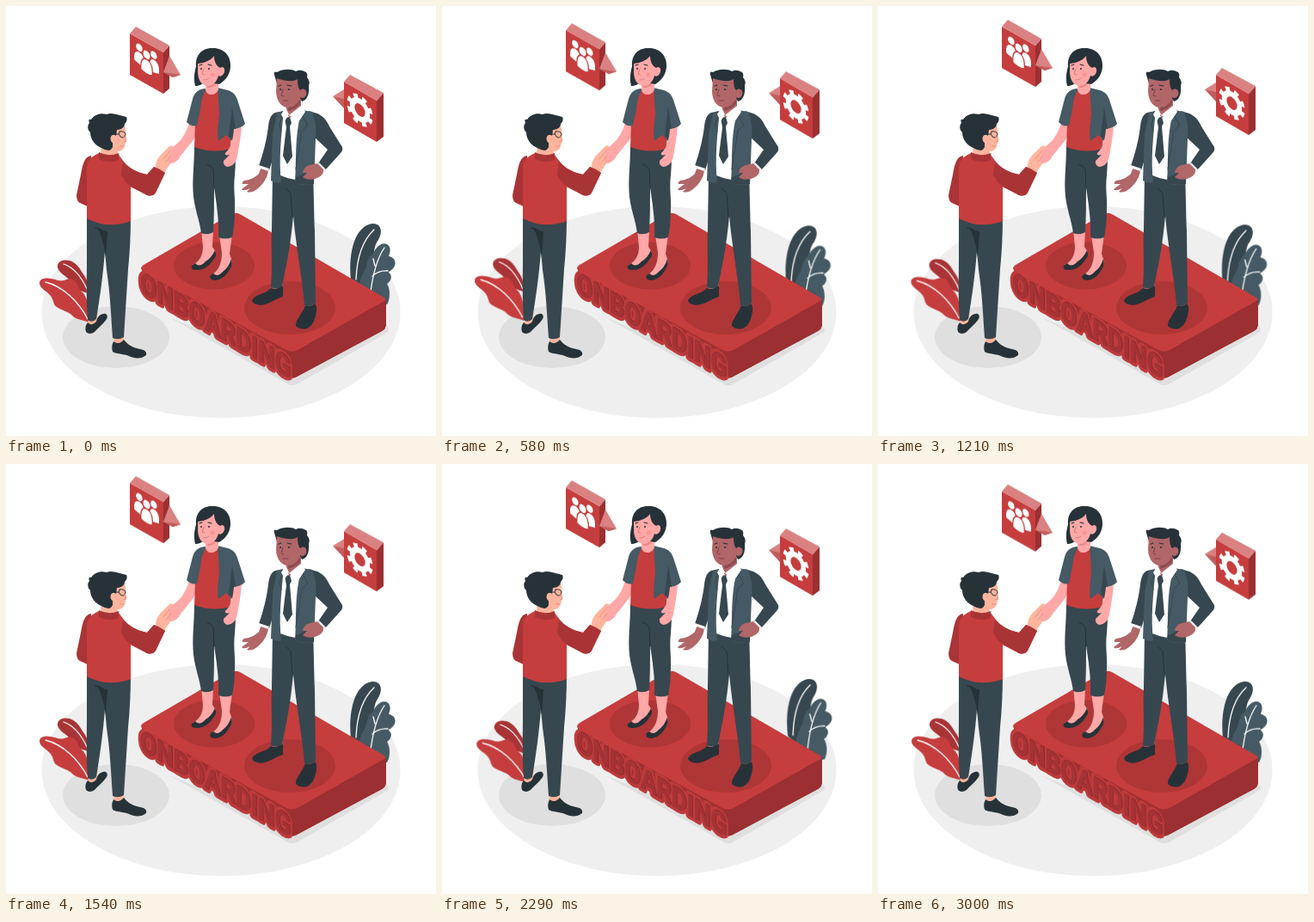
An HTML page that plays this animation: 500x500 px, repeating every 3040 ms.

```html
<!DOCTYPE html>
<html lang="en">
<head>
<meta charset="utf-8">
<title>Onboarding</title>
<style>
  html, body { margin: 0; width: 100%; height: 100%; overflow: hidden; background: #fff; }
  svg { display: block; width: 100%; height: 100%; }
  :root { --red: #c63d3d; --deep: #9e3032; --rose: #da8181; --ink: #263238; --slate: #37474f; --steel: #455a64; }
  .red { fill: var(--red); }
  .dim { fill: #a93436; }
  .deep { fill: var(--deep); }
  .rose { fill: var(--rose); }
  .ink { fill: var(--ink); }
  .slate { fill: var(--slate); }
  .steel { fill: var(--steel); }
  .white { fill: #fff; }
  .peach { fill: #ffb59d; }
  .pink { fill: #ffa8a7; }
  .brown { fill: #b16668; }
  .shade { fill: #000; opacity: .12; }
  .line { fill: none; stroke-linecap: round; stroke-linejoin: round; }
  .vein { stroke: #fff; stroke-width: 1.3; }
  .fine { stroke: var(--ink); stroke-width: 1; }
  .float { animation: float 3.04s linear infinite; }
  .sway { transform-box: view-box; transform-origin: 250px 250px; animation: sway 3.04s linear infinite; }
  @keyframes float { 50% { transform: translateY(-10px); } }
  @keyframes sway { 25% { transform: rotate(1deg); } 75% { transform: rotate(-1deg); } }
  .word { font: 700 34px Roboto, Arial, sans-serif; stroke-linejoin: round; }
  .rim { fill: #bd3a3b; stroke: #bd3a3b; stroke-width: 8.5; }
  .side { fill: #8e2b2d; stroke: #8e2b2d; stroke-width: 1; }
  .face { fill: #a53335; stroke: #a53335; stroke-width: .6; }
</style>
</head>
<body>
<svg viewBox="0 0 500 500">
  <ellipse cx="250" cy="356" rx="208.5" ry="123" fill="#efefef"/>
  <ellipse cx="128" cy="385" rx="62" ry="36" fill="#dfdfdf"/>
  <path d="M190 362L328 440Q333 442 338 440L443 380Q447 377 443 373L330 420Z" fill="#dfdfdf"/>

  <!-- plants -->
  <g class="sway">
    <path class="slate" d="M401 319C399 300 401 280 408 267C415 254 427 250 433 255C438 260 436 268 431 275C427 282 429 292 422 302C416 310 412 317 412 330Z"/>
    <path class="line vein" d="M428 260C414 273 408 293 407 318"/>
    <path class="steel" d="M410 332C410 322 413 314 418 306C420 298 421 291 427 288C429 281 437 274 443 277C448 280 447 286 445 291C451 292 454 297 452 302C450 307 445 308 445 310C450 313 448 320 443 323C447 329 447 341 443 347C432 348 418 342 410 332Z"/>
    <path class="line vein" d="M440 281C431 294 426 313 423 340M426 314Q434 307 444 308M429 302L427 294"/>
  </g>
  <g class="sway">
    <path class="dim" d="M96 334C87 332 77 328 74 320C72 314 62 312 60 304C59 297 66 294 74 296C83 299 86 306 90 312C94 317 97 326 96 334Z"/>
    <path class="line vein" d="M67 300C79 304 88 315 95 331"/>
    <path class="red" d="M97 368C90 365 82 365 77 360C73 355 64 354 59 350C54 347 56 341 51 336C47 331 38 328 39 321C42 314 53 317 60 319C68 321 70 316 77 318C84 321 83 328 88 332C94 337 98 351 97 368Z"/>
    <path class="line vein" d="M46 321C66 326 84 343 95 364"/>
  </g>

  <!-- platform -->
  <path class="deep" d="M158 306V331L325 427Q333 435 340 430L437 378Q442 375 442 370V344Z"/>
  <g transform="matrix(.81 .469 0 1 156 332.5)">
    <text class="word rim">ONBOARDING</text>
    <text class="word side" x="1" y="-.6">ONBOARDING</text>
    <text class="word face">ONBOARDING</text>
  </g>
  <path d="M333 402V433Q337 432 340 430L437 378Q442 375 442 370V342Z" fill="#9b2f31"/>
  <path class="red" d="M160 309Q154 305 160 301L260 243Q266 239 272 242L438 338Q445 341 438 344L339 400Q333 403 326 400Z"/>
  <ellipse class="shade" cx="242" cy="302" rx="47" ry="27.5"/>
  <ellipse class="shade" cx="330" cy="351" rx="53" ry="31"/>

  <!-- woman -->
  <g>
    <path class="pink" d="M227 260H241L240 280L244 286Q240 302 220 304L217 301C225 297 229 290 229 280ZM248 266H263L260 288L263 297Q258 314 243 316L239 313C248 307 251 298 251 287Z"/>
    <path class="ink" d="M243 284Q246 290 241 295C236 303 229 307 222 307Q214 307 216 302L220 299Q225 305 232 297Q239 293 243 284ZM262 294Q264 300 260 306C256 314 249 319 243 319Q235 318 238 313L241 311Q246 316 252 309Q259 304 262 294Z"/>
    <path class="slate" d="M219 163H264C268 172 267 184 266 197C264 214 267 224 266 237C266 249 265 259 263 269Q255 272 247 269C248 250 245 232 242 211C242 231 242 246 241 263Q234 267 227 264C225 249 220 238 218 222C216 203 219 185 219 163Z"/>
    <path class="line" stroke="#263238" stroke-width="1" d="M242 212L241 190Q238 185 233 184"/>
    <path class="pink" d="M214 133C211 143 207 152 201 158L187 170L194 183C202 177 210 165 217 157C222 150 223 144 224 137Z"/>
    <path class="red" d="M226 98L247 96L260 108L262 151L261 166Q241 172 219 164L221 108Z"/>
    <path class="steel" d="M231 96C223 97 219 101 217 108L210 135Q216 141 222 139L226 120Q227 105 233 97Z"/>
    <path class="steel" d="M246 95L258 98C264 100 267 103 269 109L278 137Q273 143 265 143L263 157L256 150L247 157C245 148 247 138 248 125Z"/>
    <path class="slate" d="M263 117L267 143L264 157L259 151Z"/>
    <path class="pink" d="M265 143Q271 143 274 140C273 152 271 164 269 174C268 182 263 187 257 187Q252 185 253 180L260 173C256 174 254 173 255 171C262 165 264 154 265 143Z"/>
    <path class="pink" d="M232 80H247V97C244 105 233 105 232 97Z"/>
    <path d="M234 92L246 84V88Q241 96 234 95Z" fill="#ea8886"/>
    <path class="ink" d="M220 93C218 84 219 78 221 70C220 57 228 48 241 49C254 49 262 59 261 71C260 80 256 86 248 91L232 88Q226 93 220 93Z"/>
    <path class="pink" d="M223 67C232 66 238 63 242 58C242 65 245 70 249 72C253 69 256 74 253 79Q250 83 247 81C245 89 240 93 234 93C226 92 223 84 223 76Z"/>
    <path class="line" stroke="#263238" stroke-width="1.1" d="M225 69L228 68M235 68L239 69"/>
    <circle class="ink" cx="227" cy="73" r="1"/><circle class="ink" cx="236" cy="73" r="1"/>
    <path class="line" stroke="#e07977" stroke-width="1" d="M230 73L228 79L231 80M230 86Q233 87 236 84"/>
    <circle cx="240" cy="80" r="2.6" fill="#f89492"/>
  </g>

  <!-- man in suit -->
  <g>
    <path class="brown" d="M309 318H322V331L309 334ZM347 340H359V354L349 357Z"/>
    <path class="ink" d="M308 328Q315 331 320 325Q323 325 322 331V338C314 340 309 345 301 347C294 349 286 346 286 342C290 335 302 335 308 328ZM348 348Q354 351 359 346Q362 349 361 355C360 363 357 372 350 375Q342 377 337 372C336 366 344 359 348 348Z"/>
    <path class="slate" d="M310 196L357 195C358 217 358 238 359 262L360 345Q354 351 347 348C345 320 338 286 334 244C331 278 326 302 321 326Q315 330 308 327C310 303 308 282 309 260Z"/>
    <path class="line" stroke="#263238" stroke-width="1" d="M333 246L331 218L325 212"/>
    <path class="brown" d="M297 187L305 191C304 200 299 207 293 212Q286 218 280 216L284 212Q276 216 274 213L282 207L275 207Q274 205 277 203C285 202 290 199 294 195Z"/>
    <path class="white" d="M321 124L345 118L351 203Q333 203 319 197Z"/>
    <path class="slate" d="M323 122L313 124C308 126 306 132 305 140C303 157 299 171 294 186Q299 192 306 191L316 160Z"/>
    <path class="steel" d="M323 122L315 124L310 150L308 203Q315 207 320 205C317 179 320 150 323 122Z"/>
    <path class="slate" d="M352 122L362 125C369 128 373 133 376 140L391 164Q392 168 389 171L371 191L363 183L374 167L358 152Z"/>
    <path class="steel" d="M344 121L356 123Q362 138 360 155L358 207Q346 210 336 206C338 181 335 151 344 121Z"/>
    <path class="slate" d="M358 183V207Q347 209 336 206L337 199Q350 196 358 183Z"/>
    <path class="line" stroke="#37474f" stroke-width="1" d="M344 126L351 139L344 145L337 190M321 128L318 138L320 146"/>
    <path class="white" d="M294 185L306 189L305 192L293 188ZM364 182L372 190L370 193L362 185Z"/>
    <path class="brown" d="M362 183L369 190C370 196 365 199 359 201Q350 203 345 199L350 194L345 194Q346 187 353 185Z"/>
    <path class="slate" d="M324 130L330 129L332 136L330 140L333 175L327 184L322 174L326 141Z"/>
    <path class="brown" d="M327 106L343 101V121L330 130L325 124Z"/>
    <path d="M328 117L342 109V114Q337 120 328 122Z" fill="#8f4c4f"/>
    <path class="white" d="M325 118L329 126L324 134L320 126ZM343 116L348 123L340 135L329 127Z"/>
    <path class="ink" d="M315 90L312 80Q311 75 315 77C322 73 332 73 337 76Q342 73 349 77Q351 79 350 83Q354 87 352 93C353 102 350 110 344 111L337 96Z"/>
    <path class="brown" d="M315 84C326 88 335 88 339 85C339 91 340 96 342 98C347 94 351 99 349 104Q346 109 342 106C340 114 334 118 327 118C318 117 314 107 314 99Z"/>
    <path class="line" stroke="#263238" stroke-width="1.2" d="M317 93L320 92M327 92L332 93"/>
    <circle class="ink" cx="319" cy="97" r="1"/><circle class="ink" cx="329" cy="97" r="1"/>
    <path class="line" stroke="#7f4346" stroke-width="1" d="M322 97L320 104L323 105M322 110L328 110"/>
  </g>

  <!-- man in sweater -->
  <g>
    <path class="peach" d="M95 357L107 355L104 374L96 375ZM124 379L137 380V396L126 397Z"/>
    <path class="ink" d="M95 368Q100 373 105 367C106 361 111 357 116 358Q119 360 117 364C113 370 107 374 103 379Q97 383 93 379Q91 373 95 368ZM125 390Q131 395 137 388C144 397 152 398 160 400Q164 402 163 406C157 411 149 410 143 407C136 404 129 405 124 402Q122 396 125 390Z"/>
    <path class="slate" d="M94 244H145C145 266 144 286 142 306L137 385Q131 389 124 386C122 357 121 333 117 307L115 285C113 312 109 340 105 364Q100 369 95 365C93 338 94 316 94 294Z"/>
    <path class="line" stroke="#263238" stroke-width="1.4" d="M104 258Q114 260 116 267"/>
    <path class="ink" d="M106 257C111 262 114 261 118 262L116 292Q113 271 106 257Z"/>
    <path class="dim" d="M99 174C91 175 89 185 87 196L82 220Q82 227 86 229L97 234L101 202Z"/>
    <path class="peach" d="M174 190C173 182 177 176 181 172L190 163Q194 161 195 165L189 174C194 174 195 178 192 182L183 195Z"/>
    <path class="pink" d="M190 167Q198 163 203 170C204 176 199 181 193 183Q188 183 189 178Z"/>
    <path class="line" stroke="#e5877f" stroke-width=".8" d="M183 178L190 169M186 181L192 174"/>
    <path class="red" d="M108 171L131 173L137 181C143 188 150 193 164 196L172 187Q180 190 185 194L174 217Q171 222 164 220L145 210V250Q119 260 94 247V188C94 179 100 175 108 171Z"/>
    <path class="dim" d="M136 181C143 188 150 193 164 196L172 187Q180 190 185 194L174 217Q171 222 164 220L145 210Q138 205 134 196Z"/>
    <path class="peach" d="M111 158L129 163L130 173Q121 179 110 172Z"/>
    <path class="dim" d="M108 170Q119 176 131 171L131 179Q119 184 108 178Z"/>
    <path class="peach" d="M122 139L138 139C140 147 140 156 138 163Q136 169 130 169C124 170 121 165 121 157Z"/>
    <path class="ink" d="M119 168C106 165 98 157 98 147C94 143 95 138 97 136Q95 131 99 132C103 126 110 124 117 126C123 123 131 127 140 129Q142 133 138 137C138 141 134 144 129 144L128 151L124 153L124 164Q122 168 119 168Z"/>
    <path class="peach" d="M129 152C125 147 120 151 122 157Q125 162 129 159Z"/>
    <path class="line fine" d="M126 149L131 149M132 146Q138 145 139 149Q137 155 133 152Q130 149 132 146"/>
    <path class="line" stroke="#e5877f" stroke-width="1" d="M138 151L140 157L137 158M133 163L137 163"/>
  </g>

  <!-- people bubble -->
  <g class="float">
    <path d="M183 54L190 46V96L183 102Z" fill="#9b2f31"/>
    <path class="red" d="M144 32L183 54V102L144 80Z"/>
    <path class="rose" d="M144 32L151 24L190 46L183 54Z"/>
    <path class="rose" d="M190 58L203 80L194 83L183 77Z"/>
    <path d="M183 77L203 80L194 83Z" fill="#c25d5d"/>
    <g class="white" transform="matrix(.866 .5 0 1 164 63)">
      <circle cx="-10.5" cy="-9.5" r="4.3"/>
      <circle cx="9" cy="-10.5" r="4.3"/>
      <path d="M-17 8C-18 1-16-4-10-4Q-6-4-5 0Q-9 3-9 10ZM16 8C17 0 15-5 9-5Q5-5 4 0Q8 3 8 10Z"/>
      <circle cx="-.5" cy="-6" r="4.6"/>
      <path d="M-7.5 14C-8 5-6 0-.5 0S7 5 6.5 14Q0 17-7.5 14Z"/>
    </g>
  </g>

  <!-- gear bubble -->
  <g class="float">
    <path d="M431 110L439 101V152L431 158Z" fill="#9b2f31"/>
    <path class="rose" d="M380 105L393 97V109Z"/>
    <path d="M380 105L393 108V119Z" fill="#c25d5d"/>
    <path class="red" d="M393 88L431 110V158L393 136Z"/>
    <path class="rose" d="M393 88L400 80L439 101L431 110Z"/>
    <g transform="matrix(.866 .5 0 1 411.5 121)" fill="none" stroke="#fff">
      <circle r="10.3" stroke-width="6.4"/>
      <circle r="15" stroke-width="5" pathLength="80" stroke-dasharray="5 5" stroke-dashoffset="7.5"/>
    </g>
  </g>
</svg>
</body>
</html>
```
